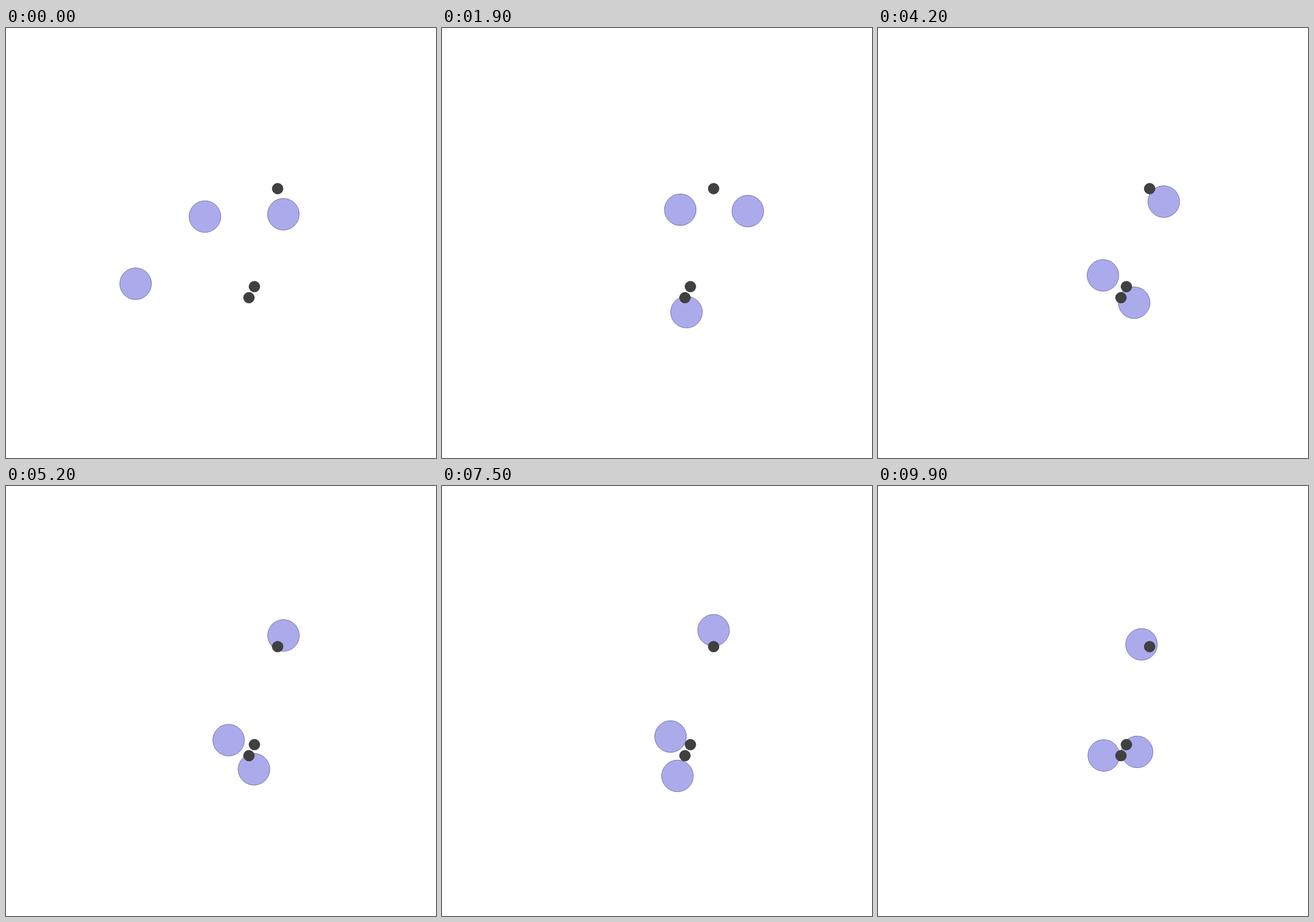
An HTML page that plays this animation: 700 px wide and 700 px high, repeating every 10 s.

```html
<!DOCTYPE html>
<html lang="en">
<head>
<meta charset="utf-8">
<title>Agents and landmarks</title>
<style>
  html, body { margin: 0; width: 100%; height: 100%; overflow: hidden; background: #fff; }
  svg { display: block; width: 100%; height: 100%; }
  .agent { fill: rgba(89, 89, 217, .5); stroke: rgba(45, 45, 109, .6); stroke-width: .9; }
  .landmark { fill: #404040; stroke: #303030; stroke-width: .8; }
</style>
</head>
<body>
<svg viewBox="0 0 700 700">
  <circle class="agent" r="25.8"/>
  <circle class="agent" r="25.8"/>
  <circle class="agent" r="25.8"/>
  <circle class="landmark" cx="442.2" cy="261.5" r="8.8"/>
  <circle class="landmark" cx="404.4" cy="421" r="8.8"/>
  <circle class="landmark" cx="395.5" cy="439" r="8.8"/>
</svg>
<script>
const LOOP = 10000, STEP = 100;

// Steps at which every agent passes its next key point
const times = [0, 10, 29, 42, 63, 88, 99];

// Between key points each agent swings out along its own bow vector
const agents = [
  { bow: [0, 14], points: [[211, 416.3], [383.8, 438.8], [386.9, 454.3], [417, 447.2],
    [385.5, 449.8], [391.2, 462], [421.8, 432.8]] },
  { bow: [-18, 0], points: [[323.8, 307], [424.7, 260.2], [366.7, 351], [366.2, 402.7],
    [393.5, 415.3], [379.3, 403.5], [367.5, 438.7]] },
  { bow: [0, -14], points: [[451.5, 303.2], [501, 326.8], [482.8, 290.3], [465.2, 282.6],
    [441, 235.8], [444.3, 269.3], [429, 257.8]] }
];

const circles = document.querySelectorAll('.agent');

function slope(points, i, axis) {
  const a = Math.max(i - 1, 0), b = Math.min(i + 1, times.length - 1);
  return (points[b][axis] - points[a][axis]) / (times[b] - times[a]);
}

// Smooth curve through the key points plus the swing
function position({ points, bow }, step, axis) {
  const i = times.findIndex((time, k) => step <= times[k + 1]);
  const span = times[i + 1] - times[i];
  const u = (step - times[i]) / span, v = 1 - u;
  return v * v * (1 + 2 * u) * points[i][axis] + u * u * (1 + 2 * v) * points[i + 1][axis]
    + span * u * v * (v * slope(points, i, axis) - u * slope(points, i + 1, axis))
    + bow[axis] * Math.sin(Math.PI * u) ** 2;
}

function draw(ms) {
  const step = Math.floor(ms % LOOP / STEP);
  agents.forEach((agent, i) => {
    circles[i].setAttribute('cx', position(agent, step, 0));
    circles[i].setAttribute('cy', position(agent, step, 1));
  });
}

const start = performance.now();
function tick() {
  draw(performance.now() - start);
  requestAnimationFrame(tick);
}
tick();
</script>
</body>
</html>
```
